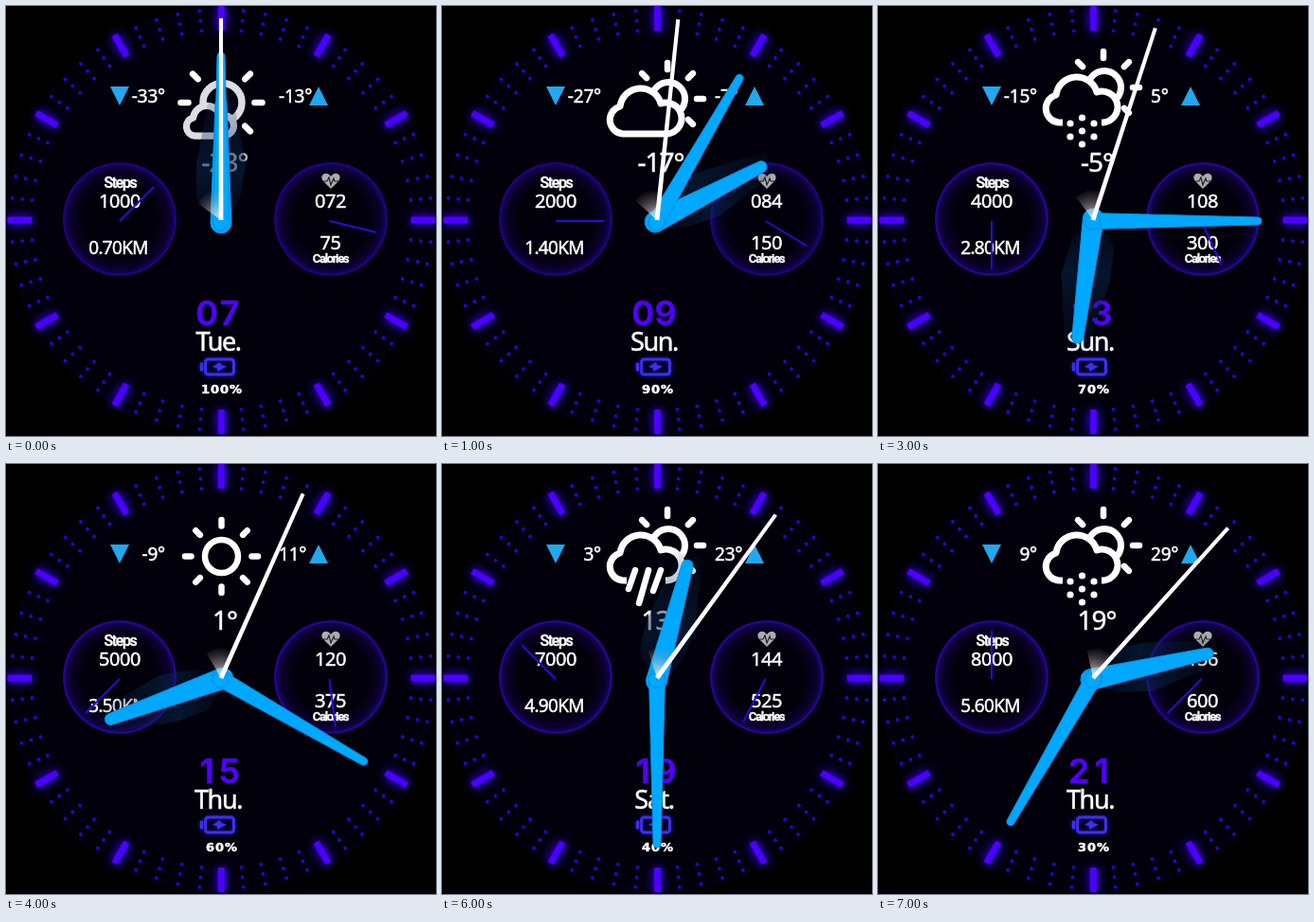
Animation of 454x454 px, one loop 8 s. Source, as an HTML page with a canvas:

```html
<!DOCTYPE html>
<html lang="en">
<head>
<meta charset="utf-8">
<title>Watch face</title>
<style>
html, body { margin: 0; width: 100%; height: 100%; overflow: hidden; background: #000; }
canvas { display: block; }
</style>
</head>
<body>
<canvas width="454" height="454"></canvas>
<script>
const c = document.querySelector('canvas').getContext('2d');
const BG = '#02010b', BLUE = '#00a8ff', VIOLET = '#4c00ff', NEEDLE = '#2e08dc';
const DAYS = ['Tue.', 'Sun.', 'Tue.', 'Sun.', 'Thu.', 'Tue.', 'Sat.', 'Thu.'];
const SANS = '"Noto Sans", sans-serif';
const CLOUD = new Path2D('M191 135A14.8 14.8 0 0 1 188 106A22 22 0 0 1 231 103A16.5 16.5 0 1 1 238 135Z');
const HEART = new Path2D('M343 193L335 185C330 179 338 173 343 180C348 173 356 179 351 185Z');

// Runs draw() with the origin moved to x, y and turned by deg.
function at(x, y, deg, draw) {
  c.save();
  c.translate(x, y);
  c.rotate(deg * Math.PI / 180);
  draw();
  c.restore();
}

function line(x1, y1, x2, y2, width, color, cap = 'round') {
  c.lineWidth = width;
  c.strokeStyle = color;
  c.lineCap = cap;
  c.beginPath();
  c.moveTo(x1, y1);
  c.lineTo(x2, y2);
  c.stroke();
}

function disc(x, y, r, fill) {
  c.fillStyle = fill;
  c.beginPath();
  c.arc(x, y, r, 0, 7);
  c.fill();
}

function ring(x, y, r, width, color) {
  c.lineWidth = width;
  c.strokeStyle = color;
  c.beginPath();
  c.arc(x, y, r, 0, 7);
  c.stroke();
}

function shape(points, fill) {
  c.fillStyle = fill;
  c.beginPath();
  points.forEach(([x, y]) => c.lineTo(x, y));
  c.closePath();
  c.fill();
}

// A thin outline gives the letters a medium weight.
function text(str, x, y, font, spacing = 0, align = 'center', color = '#fff') {
  c.font = font;
  c.letterSpacing = spacing + 'px';
  c.textAlign = align;
  c.fillStyle = c.strokeStyle = color;
  c.lineWidth = 0.5;
  c.fillText(str, x, y);
  c.strokeText(str, x, y);
}

function drawTicks() {
  for (let i = 0; i < 60; i++) {
    at(227.5, 226, i * 6, () => {
      if (i % 5) {
        for (const r of [201, 211.5, 222]) disc(0, -r, 1.9, '#2c00dc');
      } else {
        c.shadowColor = '#3c00ff';
        c.shadowBlur = 12;
        line(0, -201, 0, -225, 9, 'rgba(60,0,255,.35)', 'butt');
        line(0, -200, 0, -226, 6.5, VIOLET, 'butt');
      }
    });
  }
}

function drawDial(x) {
  const glow = c.createRadialGradient(x, 225, 40, x, 225, 60);
  glow.addColorStop(0, 'rgba(30,0,130,0)');
  glow.addColorStop(0.6, 'rgba(30,0,130,.25)');
  glow.addColorStop(1, 'rgba(36,0,150,.75)');
  disc(x, 225, 60, glow);
  c.setLineDash([1.5, 2]);
  ring(x, 225, 58.5, 2, 'rgba(52,12,180,.6)');
  c.setLineDash([]);
}

function drawRays(x, y, from, to, angles) {
  for (const a of angles) at(x, y, a, () => line(0, -from, 0, -to, 6.5, '#fff'));
}

function drawCloud(width) {
  c.fillStyle = BG;
  c.fill(CLOUD);
  c.lineWidth = width;
  c.lineJoin = 'round';
  c.stroke(CLOUD);
}

function drawWeather(kind) {
  if (kind === 'sun') {
    ring(227.5, 97.5, 17.5, 6.5, '#fff');
    drawRays(227.5, 97.5, 32, 38.5, [0, 45, 90, 135, 180, 225, 270, 315]);
    return;
  }
  if (kind === 'hazy') {
    ring(228.5, 102, 20.5, 7.5, '#dcdce4');
    drawRays(227.5, 102, 35, 43, [0, 45, 90, 135, 270, 315]);
    at(73.5, 48, 0, () => {
      c.scale(0.66, 0.66);
      c.strokeStyle = '#dcdce4';
      drawCloud(11);
    });
    return;
  }
  at(0, kind === 'partly' ? 0 : -12, 0, () => {
    ring(239, 98, 17.5, 7, '#fff');
    drawRays(238, 98, 31, 38, [0, 45, 90, 135, 315]);
    drawCloud(7);
  });
  if (kind === 'partly') return;
  c.fillStyle = BG;
  c.fillRect(195, 116, 41, 12);
  if (kind === 'rain') {
    line(204, 112, 197, 132, 6.5, '#fff');
    line(218, 112, 208, 147, 6.5, '#fff');
    line(231, 112, 223, 134, 6.5, '#fff');
  } else {
    for (const x of [203, 228]) for (const y of [124, 138]) disc(x, y, 3.6, '#fff');
    for (const y of [118, 132, 146]) disc(215.5, y, 3.6, '#fff');
  }
}

function drawHeart() {
  c.fillStyle = '#adadb0';
  c.fill(HEART);
  c.lineWidth = 1.2;
  c.strokeStyle = '#222';
  c.beginPath();
  [[334, 185], [339, 185], [341, 181], [343, 189], [346, 182], [347, 185], [352, 185]]
    .forEach(([x, y]) => c.lineTo(x, y));
  c.stroke();
}

function drawBattery(percent) {
  const color = '#3c30f0';
  c.save();
  c.shadowColor = '#2418b0';
  c.shadowBlur = 4;
  c.lineWidth = 3;
  c.strokeStyle = color;
  c.beginPath();
  c.roundRect(210.5, 373, 30, 16, 3);
  c.stroke();
  line(206.5, 378, 206.5, 384, 3.5, color);
  shape([[226, 376], [218, 381], [223, 382.5], [223, 386], [233, 380.5], [227, 379]], color);
  c.restore();
  text(percent + '%', 228, 409, 'bold 13px "DejaVu Sans", sans-serif', 1);
}

// Each digit sits in its own fixed cell.
function drawDate(day) {
  [...String(day).padStart(2, '0')].forEach((digit, i) =>
    text(digit, 212 + 24 * i, 337, '600 36px Inter, sans-serif', 0, 'center', '#5200ff'));
}

// Tapered hand with round ends, pointing up from the pivot.
function drawHand(deg, length, base, tip) {
  at(227, 227, deg, () => {
    c.fillStyle = BLUE;
    c.strokeStyle = '#0092e6';
    c.lineWidth = 1;
    c.beginPath();
    c.arc(0, 2, base, 0, Math.PI);
    c.arc(0, tip - length, tip, Math.PI, 0);
    c.closePath();
    c.fill();
    c.stroke();
  });
}

function drawHands(k) {
  at(227, 227, k * 62.5, () => {
    const shade = c.createLinearGradient(0, 0, 0, -135);
    shade.addColorStop(0, 'rgba(8,42,80,.1)');
    shade.addColorStop(0.4, 'rgba(8,42,80,.5)');
    shade.addColorStop(1, 'rgba(8,42,80,.1)');
    shape([[-8, 0], [-26, -25], [-26, -60], [-12, -135], [12, -135], [26, -60], [20, -25], [8, 0]], shade);
  });
  drawHand(k * 62.5, 130, 11, 6);
  drawHand(k * 30, 178, 8.5, 4);
  ring(227, 228, 8.5, 1, '#0092e6');
  at(227, 226, k * 6, () => {
    const flare = c.createRadialGradient(0, 0, 4, 0, 0, 32);
    flare.addColorStop(0, 'rgba(255,245,235,.75)');
    flare.addColorStop(1, 'rgba(150,130,130,.05)');
    shape([[0, 0], [-25, -18], [-15, -29], [0, -31]], flare);
    shape([[-2, -213], [2, -213], [2.4, 0], [-2.4, 0]], '#fff');
  });
}

function draw(k) {
  const bpm = 72 + 12 * k, temp = 6 * k - 23;
  c.fillStyle = '#000';
  c.fillRect(0, 0, 454, 454);
  disc(227, 227, 227, BG);
  drawTicks();
  drawDial(120);
  drawDial(343);

  drawWeather(k ? ['sun', 'partly', 'rain', 'snow'][k % 4] : 'hazy');
  shape([[110, 85], [130, 85], [120, 105]], '#22a7f0');
  shape([[320, 105], [340, 105], [330, 85]], '#22a7f0');
  text(temp - 10 + '°', 168, 102, '19px ' + SANS, -0.2, 'right');
  text(temp + 10 + '°', 288, 102, '19px ' + SANS, -0.2, 'left');
  text(temp + '°', 231, 175, '28px ' + SANS, -1, 'center', k ? '#fff' : '#b4bac6');

  text('Steps', 120.5, 192, '500 16px Roboto, sans-serif', -1.4);
  text(1000 * (k + 1), 120, 213, '20px ' + SANS, -0.5);
  text((0.7 * (k + 1)).toFixed(2) + 'KM', 118.5, 262, '19px ' + SANS, -0.7);
  drawHeart();
  text(String(bpm).padStart(3, '0'), 342.5, 213, '20px ' + SANS, -0.5);
  text(75 * (k + 1), 342.5, 257, '20px ' + SANS, -0.5);
  text('Calories', 342.5, 270.5, '500 13px Roboto, sans-serif', -1.3);

  drawDate(7 + 2 * k);
  text(DAYS[k], 224, 364, '27px ' + SANS, -1.4);
  drawBattery(100 - 10 * k);

  at(120, 227, 45 * (k + 1), () => line(0, 0, 0, -51, 2, NEEDLE, 'butt'));
  at(341.5, 227, bpm * 1.44, () => line(0, 0, 0, -51, 2, NEEDLE, 'butt'));
  drawHands(k);
}

let shown = -1;
function tick() {
  const step = Math.floor(performance.now() % 8000 / 1000);
  if (step !== shown) draw(shown = step);
  requestAnimationFrame(tick);
}
tick();
</script>
</body>
</html>
```
